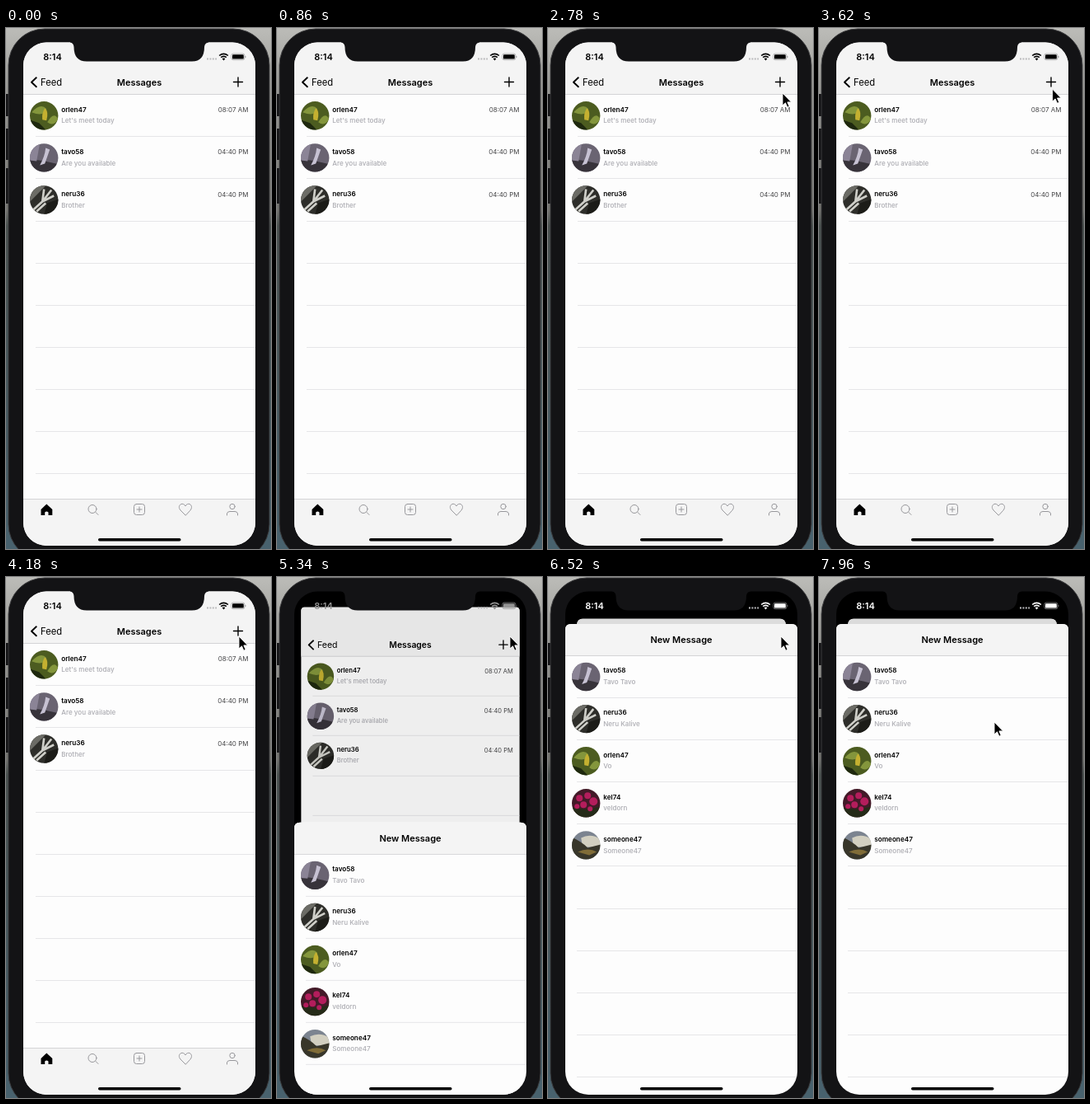
These frames come from a looping animation (322 by 632 pixels, 8000 ms). An HTML page:

```html
<!DOCTYPE html>
<html lang="en">
<head>
<meta charset="utf-8">
<title>Messages</title>
<style>
  html, body { margin: 0; width: 100%; height: 100%; overflow: hidden; background: #141416; }
  svg { display: block; width: 322px; height: 632px; font-family: Inter, "Liberation Sans", sans-serif; }
  .title { font-size: 11px; font-weight: 600; text-anchor: middle; }
  .back { font-size: 11.2px; }
  .name { font-size: 8.2px; font-weight: 600; }
  .sub { font-size: 8.1px; font-weight: 500; fill: #acacb2; }
  .time { font-size: 8px; text-anchor: end; fill: #444446; }
  .rule { stroke: #e6e6e8; }
  .edge { stroke: #d4d4d6; }
  .page { fill: #fdfdfd; }
  .bar { fill: #f4f4f4; }
  .bezel { fill: #131315; }
  .icon { fill: none; stroke: #98989c; stroke-linejoin: round; stroke-linecap: round; }
  .glyph { fill: none; stroke: #000; stroke-width: 1.4; stroke-linecap: round; stroke-linejoin: round; }
  .chevron { stroke-width: 1.9; }
</style>
</head>
<body>
<svg viewBox="0 0 322 632">
  <defs>
    <linearGradient id="wall" x2="0" y2="1">
      <stop offset="0" stop-color="#bcbcb8"/>
      <stop offset=".12" stop-color="#9a9a96"/>
      <stop offset=".35" stop-color="#747470"/>
      <stop offset=".38" stop-color="#4a5250"/>
      <stop offset="1" stop-color="#48626e"/>
    </linearGradient>
    <clipPath id="screen"><rect x="21" y="17.500" width="282" height="610.500" rx="28"/></clipPath>
    <clipPath id="round"><circle r="17.200"/></clipPath>

    <g id="leaves" clip-path="url(#round)">
      <rect x="-18" y="-18" width="36" height="36" fill="#4c5c20"/>
      <path d="M-18 18V5L-6 9 3 18zM8-18L18-8V-18z" fill="#1e280e"/>
      <path d="M-15-4Q-4-16 3-8 0 2-15-4M4 8Q12-6 17 4 12 14 4 8" fill="#84963c"/>
      <path d="M1-9Q6-5 3 6L-2 5Q-3-3 1-9" fill="#c4b030"/>
    </g>
    <g id="mist" clip-path="url(#round)">
      <rect x="-18" y="-18" width="36" height="36" fill="#6a6472"/>
      <path d="M-18 2Q-4 2 18 8V18H-18z" fill="#37333a"/>
      <path d="M-18-18H-5L-9 4-18 3z" fill="#8b8496"/>
      <path d="M2-12L7-10 1 7-5 9Q1-2 2-12" fill="#c6c1d2"/>
    </g>
    <g id="branch" clip-path="url(#round)">
      <rect x="-18" y="-18" width="36" height="36" fill="#2e2e2a"/>
      <path d="M-18-18H3L-18 3z" fill="#6c6c66"/>
      <path d="M-13 12L-2 2 9-12M-2 2L12-5M-2 2L0-13M-9 14L2 4" fill="none" stroke="#cfcfc9" stroke-width="2.600"/>
      <path d="M4 4L18-1V18H0z" fill="#1c1c18"/>
    </g>
    <g id="blossom" clip-path="url(#round)">
      <rect x="-18" y="-18" width="36" height="36" fill="#431a28"/>
      <path d="M-18 5Q0 10 18 4V18H-18z" fill="#252b18"/>
      <g fill="#b41d5c"><circle cx="-8" cy="-6" r="4"/><circle cx="2" cy="-9" r="4"/><circle cx="9" cy="-2" r="5"/><circle cx="-3" cy="2" r="4"/><circle cx="-11" cy="4" r="3"/><circle cx="5" cy="7" r="3"/></g>
    </g>
    <g id="valley" clip-path="url(#round)">
      <rect x="-18" y="-18" width="36" height="36" fill="#7c8490"/>
      <path d="M-6-9Q6-15 18-7V2H-4z" fill="#d2cfc0"/>
      <path d="M-18-10Q-6-5 2 3L18-1V18H-18z" fill="#38362a"/>
      <path d="M-10 8Q3 2 13 8L4 12z" fill="#806c38"/>
    </g>
  </defs>

  <rect width="322" height="632" fill="url(#wall)"/>
  <path class="bezel" d="M0 80H4V107H0zM0 122H4V160H0zM0 170H4V213H0z"/>
  <rect class="bezel" x="3" y="1" width="317" height="645" rx="44" stroke="#3a3a3c"/>

  <g clip-path="url(#screen)">
    <rect width="322" height="632"/>
    <g id="messages">
      <clipPath id="card"><rect id="cardShape" x="21" y="17" width="282" height="630"/></clipPath>
      <g clip-path="url(#card)">
        <rect class="page" x="21" y="17" width="282" height="630"/>
        <rect class="bar" x="21" y="17" width="282" height="63"/>
        <path class="edge" d="M21 80.5H303"/>
        <path class="glyph chevron" d="M36.800 60.300L31 65.800 36.800 71.300"/>
        <text class="back" x="42" y="69.800">Feed</text>
        <text class="title" x="162" y="69.800">Messages</text>
        <path class="glyph" d="M276.500 65.500H287.500M282 60V71"/>
        <g id="inbox"></g>
        <rect class="bar" x="21" y="571" width="282" height="76"/>
        <path class="edge" d="M21 571.5H303"/>
        <path d="M42.500 584L49.300 577.500 56.300 584V591H51.500V587.500Q49.300 585.500 47.200 587.500V591H42.500z"/>
        <g class="icon">
          <circle cx="105" cy="583.500" r="5"/><path d="M109 587.500L112 590.500"/>
          <rect x="155.500" y="577.500" width="13" height="13" rx="3"/><path d="M159 584H165M162 581V587"/>
          <path d="M218 591L212 585C207 579 215 574 218 580 221 574 229 579 224 585z"/>
          <circle cx="275" cy="580.500" r="3.200"/><path d="M268.500 591V589Q269 586.500 272 586.500H278Q281 586.500 281.500 589V591"/>
        </g>
        <rect id="dim" x="21" y="17" width="282" height="630" opacity="0"/>
      </g>
    </g>
    <g id="sheet">
      <path class="page" d="M21 640V7Q21 0 28 0H296Q303 0 303 7V640z"/>
      <path class="bar" d="M21 38V7Q21 0 28 0H296Q303 0 303 7V38z"/>
      <path class="edge" d="M21 38.500H303"/>
      <text class="title" x="162" y="23.200">New Message</text>
      <g id="contacts"></g>
    </g>
  </g>

  <path class="bezel" d="M78 16V17.500Q82 18 82.500 23 82.500 40.500 98 40.500H226Q241 40.500 241 23 241.500 18 246 17.500V16z"/>
  <g id="status">
    <text class="title" x="56.500" y="39">8:14</text>
    <path d="M244 37.500H256" stroke="#bababc" stroke-width="2" stroke-dasharray="2 1.400"/>
    <path d="M264.500 39.500L262.600 37.300Q264.500 35.800 266.400 37.300zM261.700 36.300L260.600 35.100Q264.500 31.900 268.400 35.100L267.300 36.300Q264.500 34 261.700 36.300M259.700 34.100L258.600 32.900Q264.500 28.100 270.400 32.900L269.300 34.100Q264.500 30.200 259.700 34.100"/>
    <rect x="273.900" y="31.100" width="16" height="7.600" rx="2.200" fill="none" stroke="#98989a" stroke-width=".7"/>
    <rect x="275" y="32.200" width="13.800" height="5.400" rx="1.200"/>
    <path d="M290.800 33.800Q292 35 290.800 36.200z"/>
  </g>
  <rect x="112" y="619" width="100.500" height="3.500" rx="1.750"/>
  <path id="cursor" d="M0 0V15L3.500 11.800 5.900 17.200 8.200 16.200 5.900 10.900H10.600z" stroke="#fff" stroke-width=".9"/>
</svg>
<script>
const $ = id => document.getElementById(id);
const LOOP = 8000, ROW = 51.1, SHEET_START = 5215, SHEET_TOP = 57, SHEET_TRAVEL = 575;

const inbox = [
  ["leaves", "orlen47", "Let's meet today", "08:07 AM"],
  ["mist", "tavo58", "Are you available", "04:40 PM"],
  ["branch", "neru36", "Brother", "04:40 PM"]
];
const contacts = [
  ["mist", "tavo58", "Tavo Tavo"],
  ["branch", "neru36", "Neru Kalive"],
  ["leaves", "orlen47", "Vo"],
  ["blossom", "kel74", "veldorn"],
  ["valley", "someone47", "Someone47"]
];

function fillList(id, rows, firstY, ruleX, ruleCount) {
  const items = rows.map(([picture, name, sub, time = ""], i) => `
    <g transform="translate(0 ${firstY + i * ROW})">
      <use href="#${picture}" x="46.2"/>
      <text class="name" x="67.2" y="-4.7">${name}</text>
      <text class="sub" x="67.2" y="9.2">${sub}</text>
      <text class="time" x="294.5" y="-4">${time}</text>
    </g>`);
  const rules = Array.from({ length: ruleCount }, (_, i) =>
    `<path class="rule" d="M${ruleX} ${Math.round(firstY + 25 + i * ROW) + .5}H303"/>`);
  $(id).innerHTML = rules.join("") + items.join("");
}
fillList("inbox", inbox, 106.3, 36, 9);
fillList("contacts", contacts, 64, 35, 11);

// Pointer stops: time, x, y
const pointer = [
  [900, 330, 130], [1700, 286, 82], [2780, 285, 79],
  [4100, 283, 72], [6750, 283, 72], [7900, 213, 176]
];

function pointerAt(t) {
  const next = pointer.findIndex(stop => stop[0] > t);
  if (next === 0) return pointer[0].slice(1);
  if (next < 0) return pointer.at(-1).slice(1);
  const [t0, x0, y0] = pointer[next - 1], [t1, x1, y1] = pointer[next];
  const u = (t - t0) / (t1 - t0), e = u * u * (3 - 2 * u);
  return [x0 + (x1 - x0) * e, y0 + (y1 - y0) * e];
}

// Critically damped spring from 0 to 1
function spring(ms) {
  const w = Math.max(0, ms) * .0155;
  return 1 - (1 + w) * Math.exp(-w);
}

function draw(t) {
  const p = spring(t - SHEET_START);
  $("messages").setAttribute("transform",
    `translate(${21 + 14.1 * p} ${17 + 33.5 * p}) scale(${1 - .1 * p}) translate(-21 -17)`);
  $("cardShape").setAttribute("rx", 8 * p);
  $("dim").setAttribute("opacity", .1 * p);
  $("sheet").setAttribute("transform", `translate(0 ${SHEET_TOP + SHEET_TRAVEL * (1 - p)})`);
  const shade = Math.round(255 * p);
  $("status").setAttribute("fill", `rgb(${shade},${shade},${shade})`);
  $("cursor").setAttribute("transform", `translate(${pointerAt(t)})`);
}

const start = performance.now();
function tick() {
  draw((performance.now() - start) % LOOP);
  requestAnimationFrame(tick);
}
tick();
</script>
</body>
</html>
```
